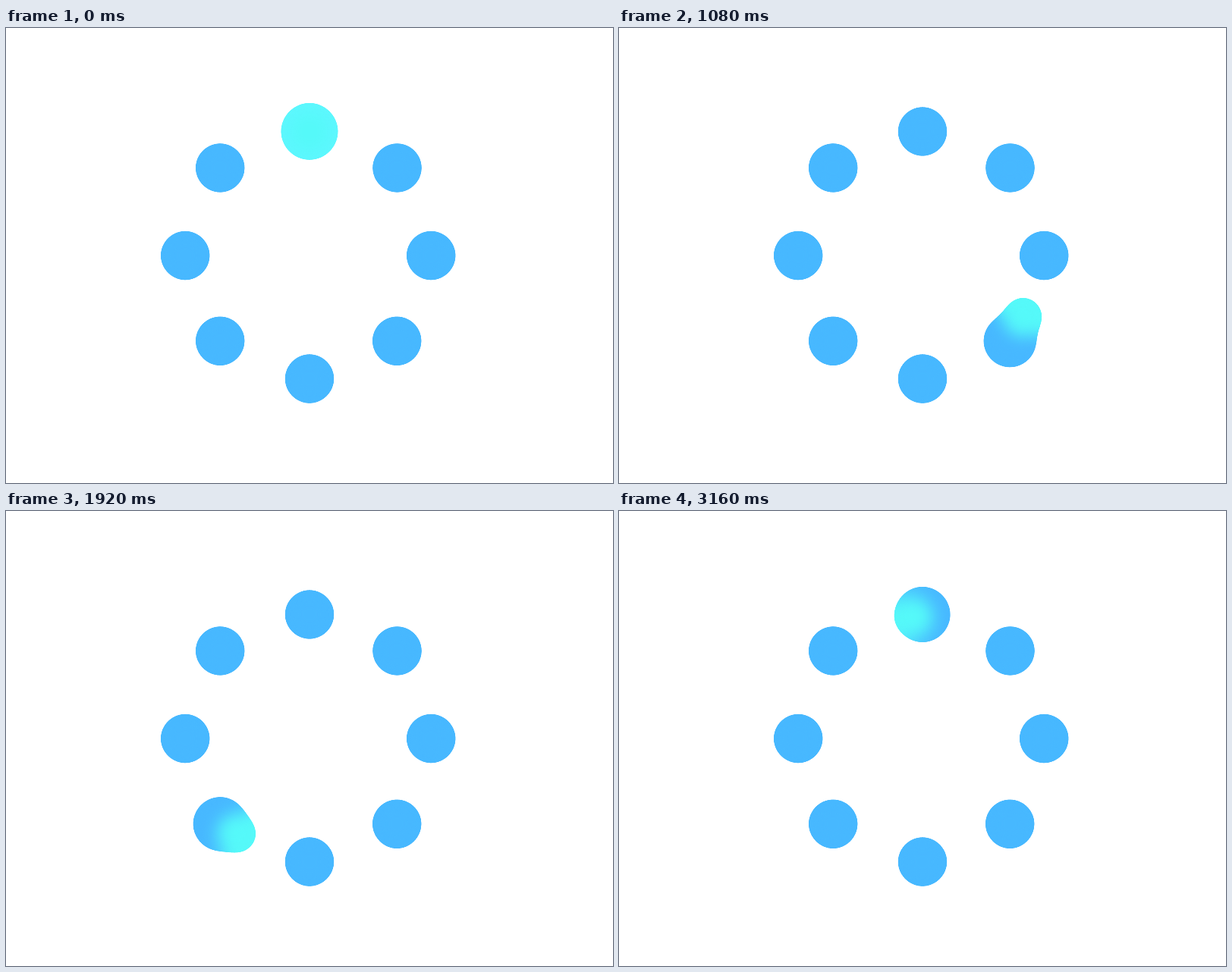
Recreate the animation shown at these times as an HTML page. Size 800x600 px, loop 3200 ms.

```html
<!DOCTYPE html>
<html lang="en">
<head>
<meta charset="utf-8">
<title>Gooey loader</title>
<style>
  html, body { margin: 0; width: 100%; height: 100%; overflow: hidden; background: #fff; }
  svg { display: block; width: 800px; height: 600px; }
</style>
</head>
<body>
<svg viewBox="0 0 800 600">
  <defs>
    <filter id="goo" filterUnits="userSpaceOnUse" x="0" y="0" width="800" height="600"
            color-interpolation-filters="sRGB">
      <feGaussianBlur stdDeviation="10"/>
      <feColorMatrix values="1 0 0 0 0  0 1 0 0 0  0 0 1 0 0  0 0 0 40 -19.5"/>
    </filter>
  </defs>
  <g id="stage" filter="url(#goo)"></g>
</svg>
<script>
const LOOP = 3200, STEP = 400, TICK = 40;
const REST = 32.2, PEAK = 37.5, BULGE = 5;
const BLUE = [71, 184, 255], LIT = [94, 247, 255];

// Clockwise from the top
const spots = [
  [400, 136.4], [515.5, 184.4], [560.2, 300], [515.2, 412.7],
  [400, 462.5], [282.2, 412.7], [236.2, 300], [282.2, 184.4]
];

const stage = document.getElementById('stage');

function addCircle(x, y, r, fill) {
  const c = document.createElementNS('http://www.w3.org/2000/svg', 'circle');
  stage.appendChild(c);
  set(c, { cx: x, cy: y, r, fill });
  return c;
}

function set(el, attrs) {
  for (const k in attrs) el.setAttribute(k, attrs[k]);
}

// Blurring a disc pulls its half-alpha edge inwards; make up for it
const grow = r => r + 50 / r;

const mix = (a, b, k) => 'rgb(' + a.map((v, i) => Math.round(v + (b[i] - v) * k)) + ')';

const dots = spots.map(([x, y]) => addCircle(x, y, grow(REST), mix(BLUE, LIT, 0)));
const runner = addCircle(400, 136, 26.5, '#55f9f9');

function drawDot(dot, i, t) {
  let dt = t - i * STEP;
  if (dt > LOOP / 2) dt -= LOOP;
  if (dt < -LOOP / 2) dt += LOOP;
  const swell = Math.max(0, 1 - Math.abs(dt) / 220);
  // The top dot lights up only when the loop restarts
  const lit = i === 0 && dt < 0 ? 0 : Math.max(0, 1 - (dt / 80) ** 2);
  set(dot, { r: grow(REST + (PEAK - REST) * swell), fill: mix(BLUE, LIT, lit) });
}

function drawRunner(t) {
  const i = Math.floor(t / STEP), u = t / STEP - i;
  const [ax, ay] = spots[i], [bx, by] = spots[(i + 1) % spots.length];
  const dx = bx - ax, dy = by - ay;
  const k = BULGE * 4 * u * (1 - u) / Math.hypot(dx, dy);
  set(runner, { cx: ax + dx * u + dy * k, cy: ay + dy * u - dx * k });
}

function frame(now) {
  const t = Math.floor((now % LOOP) / TICK) * TICK;
  dots.forEach((dot, i) => drawDot(dot, i, t));
  drawRunner(t);
  requestAnimationFrame(frame);
}
requestAnimationFrame(frame);
</script>
</body>
</html>
```
